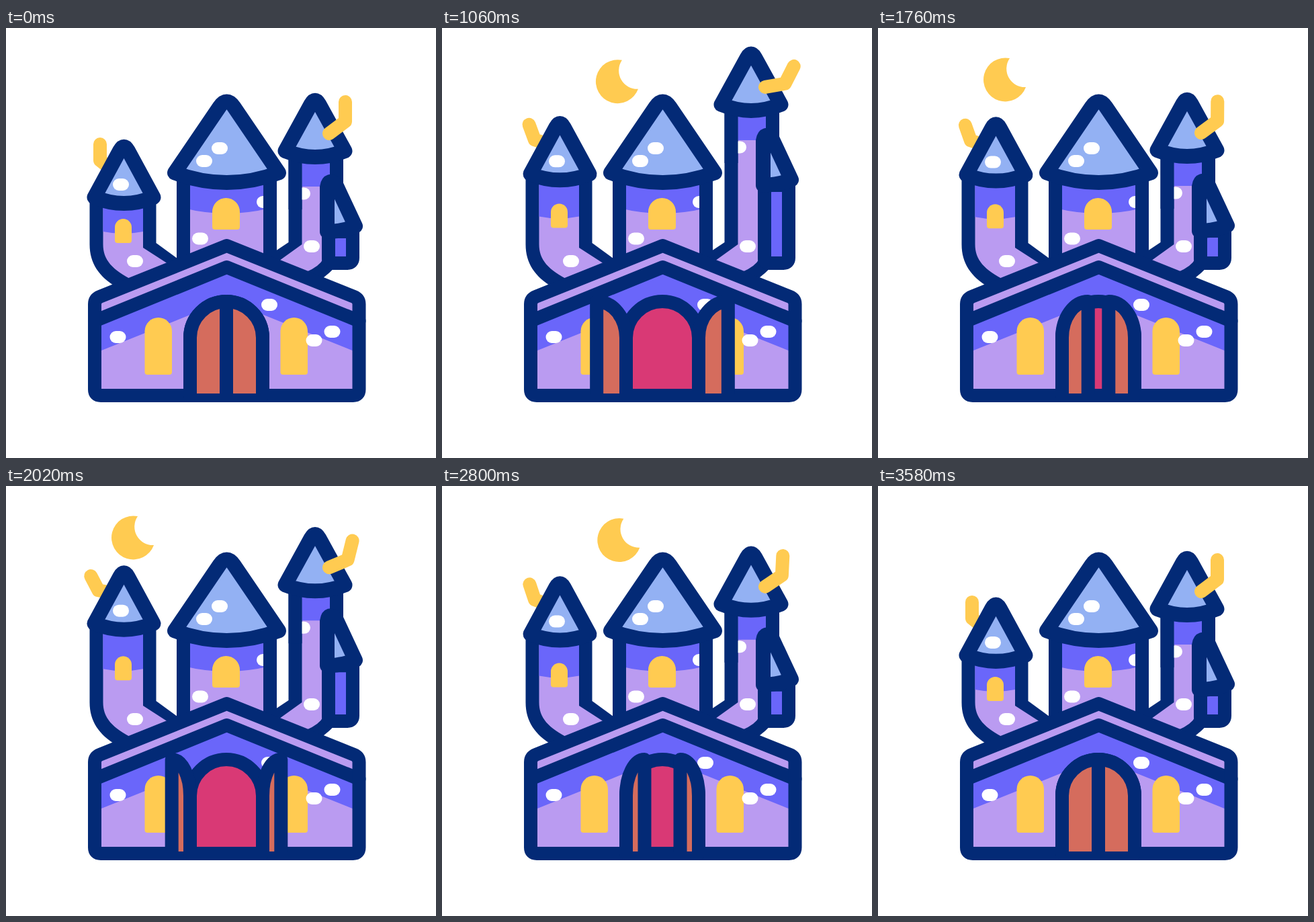
These frames come from a looping animation (640 by 640 pixels, 3600 ms). An HTML page:

```html
<!DOCTYPE html>
<html lang="en">
<head>
<meta charset="utf-8">
<title>Castle at night</title>
<style>
  html, body { margin: 0; width: 100%; height: 100%; overflow: hidden; background: #fff; }
  svg { display: block; width: 640px; height: 640px; }
  .line { stroke: #032a76; stroke-width: 20; stroke-linejoin: round; stroke-linecap: round; }
  .flag { fill: none; stroke: #ffcb51; stroke-width: 20; stroke-linejoin: round; stroke-linecap: round; }
  .navy { fill: #032a76; }
  .yellow { fill: #ffcb51; }
  .wall { fill: #ba9bf1; }
  .shade { fill: #6a66fa; }
  .roof { fill: #93b1f3; stroke-width: 22; }
  .wood { fill: #d56c5d; }
  .hall { fill: #d93975; }
  .none { fill: none; }
  .spot { fill: #fff; }
</style>
</head>
<body>
<svg id="stage" viewBox="0 0 640 640"></svg>
<script>
const LOOP = 3600;
const stage = document.getElementById('stage');

// Keyframes as [time, value], eased in and out between neighbours.
const rightLift = [[520, 0], [1120, 71], [1720, 0], [2320, 71], [2920, 0]];
const leftLift = [[300, 0], [850, 48], [1420, 5], [1980, 48], [2500, 9.5], [3050, 48], [3595, 0]];
const moonAngle = [[540, 73.6], [1460, -15.7], [2380, -15.7], [3330, 73.6]];
const doorWidth = [220, 520, 785, 1035, 1280, 1546, 1831, 2096, 2358, 2625, 2890, 3157, 3425]
  .map((time, i) => [time, i % 2 ? -47 : 54]);

function valueAt(keys, time) {
  const next = keys.findIndex(key => key[0] > time);
  if (next === 0) return keys[0][1];
  if (next < 0) return keys[keys.length - 1][1];
  const [t0, v0] = keys[next - 1], [t1, v1] = keys[next];
  const u = (time - t0) / (t1 - t0);
  return v0 + (v1 - v0) * u * u * (3 - 2 * u);
}

const path = (cls, d) => `<path class="${cls}" d="${d}"/>`;
const group = (transform, ...parts) => `<g transform="${transform}">${parts.join('')}</g>`;
const lift = (y, ...parts) => group(`translate(0 ${-y})`, ...parts);
const spot = (x, y) => `<rect class="spot" x="${x - 12}" y="${y - 9}" width="24" height="18" rx="9"/>`;

function arch(x, y, w, h) {
  const r = w / 2;
  return path('yellow', `M${x} ${y + r}a${r} ${r} 0 0 1 ${w} 0V${y + h - 4}q0 4 -4 4H${x + 4}q-4 0 -4 -4Z`);
}

function cone(cx, half, apex, base, sag) {
  const cut = 0.14, dx = half * cut, y = apex + (base - apex) * cut;
  return path('roof line', `M${cx - half} ${base}L${cx - dx} ${y}Q${cx} ${apex} ${cx + dx} ${y}` +
    `L${cx + half} ${base}Q${cx} ${base + sag} ${cx - half} ${base}Z`);
}

function moon(angle) {
  const a = angle * Math.PI / 180;
  return group(`translate(${220.7 + 117 * Math.sin(a)} ${189.7 - 117 * Math.cos(a)})`,
    path('yellow', 'M7 -32A32.5 32.5 0 1 0 31 11A27.5 27.5 0 0 1 7 -32Z'));
}

function leftTower(up) {
  const top = 252 - up;
  return lift(up, group(`rotate(${-up * 0.585} 150 205)`, path('flag', 'M140 173V197L150 205'))) +
    path('navy', `M124.5 ${top}V322C124.5 350 138 370 165 386L270 354L223.5 320V${top}Z`) +
    path('wall', `M144.5 ${top}V322C144.5 345 158 360 190 376L252 358L204 327V${top}Z`) +
    lift(up * 0.65, path('shade', `M144.5 ${252 - up * 0.35}V303Q174 309 204 303V${252 - up * 0.35}Z`),
      arch(162, 284, 25, 36)) +
    spot(192, 347) +
    lift(up, cone(175.5, 44, 171, 252, 18), spot(171, 233));
}

function rightTower(up) {
  const top = 183 - up;
  return path('navy', `M420.5 ${top}V319L380 346L440 400L466 376Q502 352 502 325V${top}Z`) +
    path('wall', `M440.5 ${top}V322L396 354L440 375L447 363Q466 355 472 344V${top}Z`) +
    lift(up, path('shade', 'M440.5 183H482V236H440.5Z'), spot(441, 246.5),
      path('navy', 'M420.5 183H440.5V270H420.5Z')) +
    spot(455, 325) +
    path('shade line', `M480 ${303 - up}V344Q480 350 486 350H508Q516 350 516 342V${303 - up}Z`) +
    lift(up, cone(460, 44.5, 102, 183, 18),
      path('roof line', 'M478 303V237Q480 223 491 233L520 295Q500 303 478 303Z'),
      group(`rotate(${up * 0.39} 481 157)`, path('flag', 'M481 157L505 139V110')));
}

const middleTower =
  path('wall', 'M264 220H393V380H264Z') +
  path('shade', 'M264 220H393V268Q328.5 284 264 268Z') +
  arch(307, 253, 41, 47) + spot(385, 259) + spot(289, 313.5) +
  path('none line', 'M264 220V380M393 220V380') +
  cone(328.5, 77.5, 101.5, 215.5, 29) + spot(318, 179) + spot(295, 198);

const house = 'M132 411Q132 403 140 399.8L328.5 324L517.5 399.8Q525.5 403 525.5 411' +
  'V538Q525.5 547 516.5 547H141Q132 547 132 538Z';
const hall =
  path('wall', house) +
  path('shade', 'M132 436L328.5 356L525.5 436V484L328.5 405L132 484Z') +
  arch(206.5, 431, 40.5, 85) + arch(408.5, 431, 40.5, 85) +
  spot(166.5, 460) + spot(392, 412) + spot(458.5, 465) + spot(485.5, 452) +
  path('none line', 'M132 436L328.5 356L525.5 436') +
  path('none line', house) +
  path('hall line', 'M274 547V461a54 54 0 0 1 108 0V547Z');

function doors(width) {
  const edge = 274 + width;
  const outline = `M274 544V461A${Math.abs(width)} 54 0 0 ${width > 0 ? 1 : 0} ${edge} 407V544`;
  const leaf = path('wood', outline) +
    `<path class="none line" style="stroke-linecap:butt" d="${outline}"/>`;
  return leaf + group('translate(656 0) scale(-1 1)', leaf);
}

function draw() {
  const time = performance.now() % LOOP;
  stage.innerHTML = moon(valueAt(moonAngle, time)) +
    leftTower(valueAt(leftLift, time)) +
    rightTower(valueAt(rightLift, time)) +
    middleTower + hall +
    doors(valueAt(doorWidth, time));
  requestAnimationFrame(draw);
}
draw();
</script>
</body>
</html>
```
